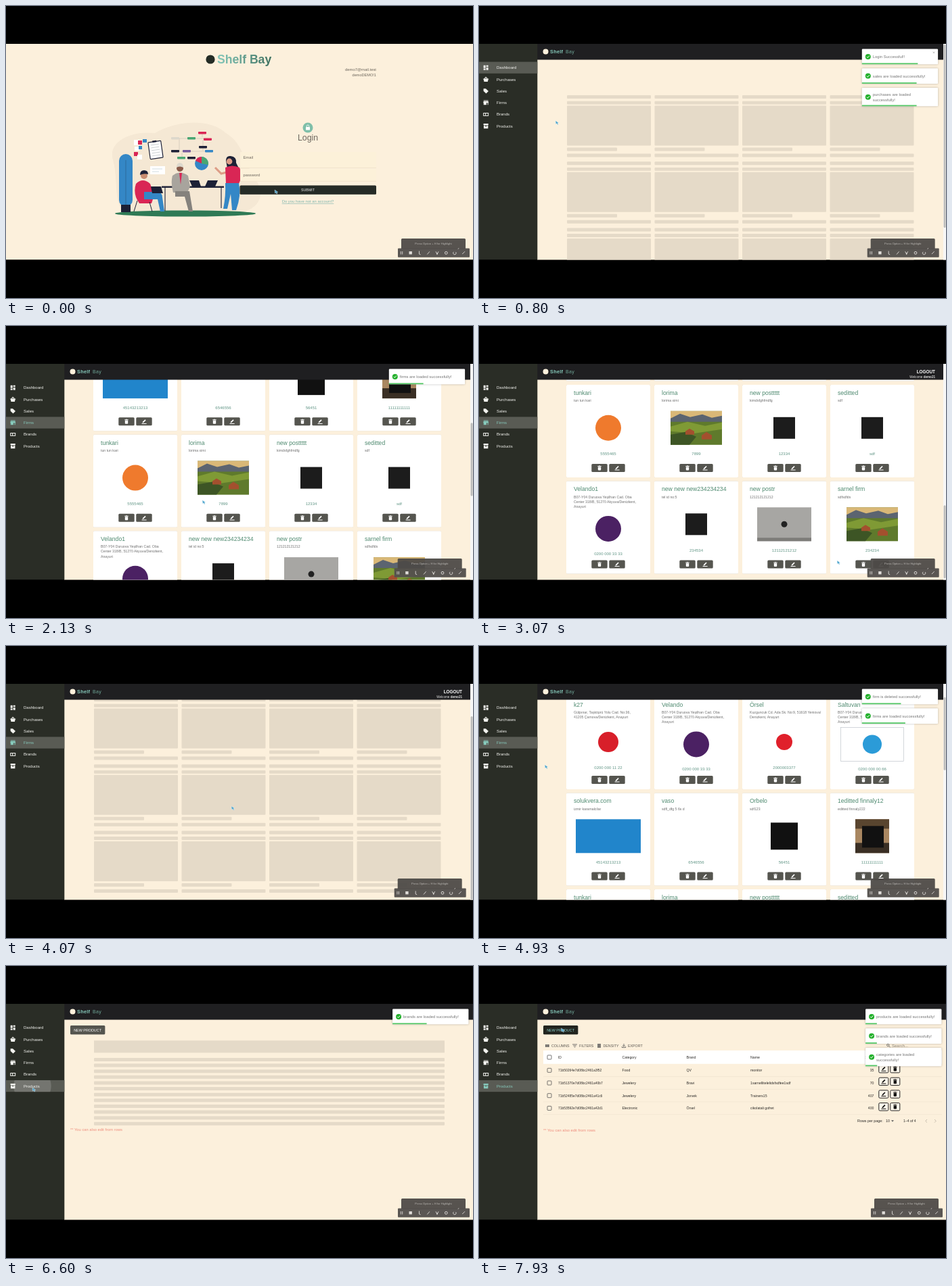
These frames come from a looping animation (690x432 px, 8000 ms). An HTML page:

```html
<!DOCTYPE html>
<html lang="en">
<head>
<meta charset="utf-8">
<title>Stock keeping demo</title>
<style>
  html, body { margin: 0; width: 100%; height: 100%; overflow: hidden; background: #000; }
  svg { display: block; width: 100%; height: 100%; font-family: "Liberation Sans", Arial, sans-serif; }
  .toast { filter: drop-shadow(0 .6px 1.6px #0004); }
  .card { filter: drop-shadow(0 .6px .7px #0003); }
</style>
</head>
<body>
<svg id="stage" viewBox="0 0 690 432"></svg>
<script>
const LOOP = 8000, VIEW = 318;
const CREAM = '#fcf0dc', GREEN = '#4f8a70', DARK = '#2a2d26', BTN = '#55554f', BONE = '#e5dac8', TEAL = '#86c9bb';
const RED = '#d92655', BLUE = '#3487c6', NAVY = '#1c2036';

// Markup helpers
const rect = (x, y, w, h, fill, r = 0, more = '') =>
  `<rect x="${x}" y="${y}" width="${w}" height="${h}" fill="${fill}" rx="${r}" ${more}/>`;
const circle = (x, y, r, fill, more = '') => `<circle cx="${x}" cy="${y}" r="${r}" fill="${fill}" ${more}/>`;
const oval = (x, y, rx, ry, fill) => `<ellipse cx="${x}" cy="${y}" rx="${rx}" ry="${ry}" fill="${fill}"/>`;
const path = (d, fill, more = '') => `<path d="${d}" fill="${fill}" ${more}/>`;
const line = (d, color, w = 1, more = '') => path(d, 'none', `stroke="${color}" stroke-width="${w}" ${more}`);
const text = (x, y, s, size, fill, more = '') => `<text x="${x}" y="${y}" font-size="${size}" fill="${fill}" ${more}>${s}</text>`;
const at = (x, y, body, more = '') => `<g transform="translate(${x} ${y})" ${more}>${body}</g>`;
const group = (id, body, more = '') => `<g id="${id}" ${more}>${body}</g>`;
const MID = 'text-anchor="middle"', END = 'text-anchor="end"', BOLD = 'font-weight="700"';
const repeat = (n, f) => Array.from({ length: n }, (_, i) => f(i)).join('');

const trash = c => path('M-2.2-1.6h4.4v4.2q0 .8-.8.8h-2.8q-.8 0-.8-.8zM-2.7-3h1.6l.4-.5h1.4l.4.5h1.6v.9h-5.4z', c);
const pen = c => path('M-2.4 1.9l.3-1.4 3.6-3.6 1.2 1.2-3.6 3.6zM-3.4 2.6h7v1h-7z', c);

// Login page
function illustration() {
  const tag = ([x, y, c]) => rect(x, y, 12, 3.4, c, .8);
  const tags = [[284, 186, RED], [244, 194, '#ddd8cc'], [268, 194, '#49a672'], [292, 195.5, RED], [285, 207, NAVY],
    [244, 213, NAVY], [261, 213, '#745a9c'], [294, 213, BLUE], [253, 223, '#49a672'], [268, 223, NAVY]];
  return path('M158 228C150 200 185 184 220 188C250 170 300 165 325 188C352 204 352 235 372 262C383 285 370 301 345 306H175C158 290 166 255 158 228Z', '#f5e8d4')
    + oval(265, 307, 104, 4.6, '#2f7a55')
    + rect(167, 219, 20, 78, BLUE, 10) + line('M177 228v66', '#2b6594', .8) + rect(170, 294, 14, 11, NAVY)
    + rect(189, 198, 8, 8, '#fff') + rect(195, 199, 6, 6, RED) + rect(202, 197, 6, 5, BLUE)
    + rect(190, 208, 7, 6, '#fff') + rect(196, 207, 5, 5, BLUE) + rect(189, 216, 6, 6, RED) + rect(194, 220, 7, 7, '#fff')
    + at(221, 213, rect(-9.5, -12.5, 19, 25, '#fff', 1, `stroke="${NAVY}" stroke-width="1.2"`) + rect(-3, -14, 6, 2.5, NAVY)
      + repeat(5, i => line(`M-6 ${-8 + i * 4}h12`, '#b9bfc2', .7)), '').replace('213)', '213) rotate(-8)')
    + rect(213, 237, 22, 12, '#fff') + line('M216 241h15M216 245h10', '#c6d3da', .8)
    + line('M290 189v5M250 196h48M256 196v19M291 198v16M250 215h48M260 217v7', '#b9b4a8', .5) + tags.map(tag).join('')
    + circle(289, 233, 10, BLUE) + path('M289 233V223A10 10 0 0 1 298.7 235Z', '#49a672') + path('M289 233V223A10 10 0 0 0 280 229Z', RED)
    // seated worker on the left
    + path('M192 263q10-10 21 0l6 17-4 12h-18q-10-14-5-29z', RED) + line('M194 288l-5 16M212 290l4 14', NAVY, 1)
    + path('M204 275h20q7 1 7 8l3 21h-6l-4-18h-20z', BLUE) + circle(204, 251, 5, '#c98d70') + path('M198 250q0-7 6-7t6 6q-6-2-12 1z', NAVY)
    // table with laptops
    + rect(230, 266.5, 92, 2.4, NAVY) + line('M235 268v35M318 268v31', NAVY, 1.1)
    + path('M214 267h15l3 10h-16zM271 258h14l3 9h-13zM298 258h15l-4 9h-15z', NAVY)
    // seated worker in the middle
    + path('M246 251q11-9 23 0l3 16-4 9h-21q-4-14-1-25z', '#a8a49d') + path('M250 274h21l5 30h-6l-6-22h-14z', '#85827d')
    + path('M256 247l2 17 2-17z', RED) + circle(257, 240, 5, '#8b5a48') + path('M252 239q0-7 5-7t5 7q-5-3-10 0z', '#ddd8cc')
    // standing presenter
    + path('M325 229q0-8 7-7 9 1 8 10l4 8h-17z', NAVY) + line('M326 246l-8 2-9-9', '#dd9c86', 3) + circle(330, 230, 4.4, '#dd9c86')
    + path('M324 239q10-5 21 0l4 12-5 12h-19z', RED) + path('M324 262h20q4 18-4 40h-6l-2-24-5 22h-6q4-20 3-38z', BLUE);
}

function login() {
  return rect(0, 56, 690, 319.5, CREAM)
    + `<linearGradient id="brand"><stop stop-color="${TEAL}"/><stop offset="1" stop-color="#3f7160"/></linearGradient>`
    + circle(302, 79, 6.6, '#242c25') + text(312, 85, 'Shelf Bay', 17.6, 'url(#brand)', BOLD)
    + text(547, 96, 'demo7@mail.test', 5.9, '#6b655c', END) + text(547, 104.3, 'demoDEMO!1', 5.6, '#6b655c', END)
    + illustration()
    + circle(446, 180, 7.5, '#7fbfa9') + rect(443, 179, 6, 4.6, '#fff', .7) + line('M444.3 179v-1.3a1.7 1.7 0 0 1 3.4 0v1.3', '#fff', .8)
    + text(446, 199, 'Login', 12.3, '#6d675e', MID)
    + rect(346, 216, 201, 23.5, '#fcf1d9', 1) + rect(346, 241, 201, 18.3, '#fcf1d9', 1)
    + line('M346 239.5h201M346 259.3h201', '#ece0c6', .7)
    + text(350.5, 226, 'Email', 5.8, '#6d675e') + text(350.5, 252, 'password', 5.8, '#6d675e')
    + rect(345.5, 265.5, 201.5, 13.2, '#252b26', 1.5, 'class="card"') + text(446, 274, 'SUBMIT', 5.3, '#eee', MID)
    + text(446, 291, 'Do you have not an account?', 5.9, '#7fb5ad', MID + ' text-decoration="underline"');
}

// Cards
const LINES = 'B07-Y04 Duruova Yeşilhan Cad. Oba|Center 318/B, 51270 Akyuva/Denizkent,|Anayurt';
const purple = ['circle', '#4b2163', 19], black = ['square', '#1c1c1c', 32], field = ['field'];
const TOP = [
  ['k27', 'Gülpınar, Taşköprü Yolu Cad. No:36,|41205 Çamova/Denizkent, Anayurt', '0200 000 11 22', ['circle', '#d81f2a', 15]],
  ['Velando', LINES, '0200 000 33 33', purple],
  ['Örsel', 'Kuzguncuk Cd. Ada Sk. No:9, 51618 Yeniova/|Denizkent, Anayurt', '2000003377', ['circle', '#e0202b', 12]],
  ['Saltuvan', LINES, '0200 000 00 66', ['framed', '#2b9bd8', 14]],
  ['solukvera.com', 'izmir karamalcilar', '45143213213', ['banner', '#2185cb']],
  ['vaso', 'sdfl_dfg 5 6s d', '6546556', ['none']],
  ['Orbelo', 'sdf123', '56451', ['square', '#111', 40]],
  ['1editted finnaly12', 'editted finnaly222', '11111111111', ['poster']]];
const BOTTOM = [
  ['tunkari', 'tun tun kari', '5555465', ['circle', '#ef7a2d', 19]],
  ['lorima', 'lorima ximi', '7899', field],
  ['new posttttt', 'kimdsfghfmdfg', '12334', black],
  ['seditted', 'sdf', 'sdf', black],
  ['Velando1', LINES, '0200 000 33 33', purple],
  ['new new new234234234', 'tel id no:5', '234534', black],
  ['new postr', '121212121212', '12112121212', ['laptop']],
  ['sarnel firm', 'sdfsdfds', '234234', field]];
const BRANDS = ['Vaso', 'Rilu', 'Bravi', 'Jorvek', 'Haldora', 'Örsel', 'Dolmy', 'QV',
  'Trainers', 'Orbelo', 'new brand', 'mestan', 'new new', 'brand12', 'sdf', 'test'];

function picture([kind, color, size]) {
  switch (kind) {
    case 'circle': return circle(0, 0, size, color);
    case 'square': return rect(-size / 2, -size / 2, size, size, color);
    case 'banner': return rect(-48, -25, 96, 50, color);
    case 'framed': return rect(-46.5, -25, 93, 50, '#fff', 0, 'stroke="#b5bcc4" stroke-width=".6"') + circle(0, 0, size, color);
    case 'poster': return rect(-25, -25, 50, 50, '#a98761') + rect(-25, -25, 50, 14, '#59452f') + rect(-25, 10, 50, 15, '#3a2f24') + rect(-15, -15, 32, 32, '#111');
    case 'laptop': return rect(-40, -25, 80, 50, '#a7a6a3') + rect(-40, 20, 80, 5, '#7d7c79') + circle(0, 0, 4.5, '#222');
    case 'field': return rect(-38, -25, 76, 50, '#5f7a2c') + rect(-38, -25, 76, 11, '#d9b877')
      + path('M-38-14l14-7 15 5 18-4 14 5 15-3v9h-76z', '#5b6470') + path('M-38-2l25-7 26 6 25-5v10l-40 6-36-3z', '#7f9a35')
      + path('M-38 10l22-4 16 7-10 12h-28z', '#3d5525') + path('M-16 5l6-4 7 4v5h-13zM8 11l7-5 8 5v6H8z', '#a3502e');
    default: return '';
  }
}

function card(i, title, desc = '', phone = '', image = ['none']) {
  const rows = desc.split('|'), n = rows.length;
  return at(129 + i % 4 * 130, 130 + Math.floor(i / 4) * 142.5,
    rect(0, 0, 124, 137, '#fff', 1.5, 'class="card"') + text(11, 14.8, title, 8.65, GREEN)
    + rows.map((s, k) => text(11, 25 + k * 7.1, s, 5.2, '#6f6f6f')).join('')
    + at(62, 60.5 + 3.3 * n, picture(image)) + text(62, 101.8 + 2.4 * n, phone, 6, '#5f9484', MID)
    + rect(37.3, 117, 23.4, 12, BTN, 1.5) + rect(63.3, 117, 23.4, 12, BTN, 1.5)
    + at(49, 123, trash('#fff')) + at(75, 123, pen('#fff')));
}

const heading = (title, button) => text(386, 104, title, 16.3, GREEN, MID + ' ' + BOLD)
  + rect(95, 108, 38.5, 13.5, BTN, 1.5, 'class="card"') + text(114.2, 116.8, button, 5.4, '#fff', MID);

const bones = () => repeat(12, i => {
  const bone = (y, w, h) => rect(0, y, w, h, BONE, 1);
  return at(130 + i % 4 * 129.5, 132 + Math.floor(i / 4) * 98.2,
    bone(0, 124, 5) + bone(8.7, 124, 4.8) + bone(15.6, 124, 59) + bone(77.6, 74, 5) + bone(86.6, 124, 5));
});

// Products page
const newProduct = group('newProduct', rect(95, 88, 51.3, 13.3, BTN, 1.5, 'class="card"') + text(120.6, 96.6, 'NEW PRODUCT', 5.4, '#fff', MID));
const hint = y => text(95, y, '** You can also edit from rows', 5.8, '#ee8c7c');

const productBones = () => rect(130, 110.3, 518, 18, BONE) + repeat(12, i => rect(130, 136 + i * 8.62, 518, 5, BONE, 1)) + hint(244);

function productTable() {
  const box = y => rect(101, y - 3, 6, 6, 'none', .8, 'stroke="#555" stroke-width=".8"');
  const cells = (y, ...c) => [117, 211.5, 306.5, 401].map((x, i) => text(x, y, c[i], i ? 5.2 : 4.95, '#2c2a28')).join('');
  const rows = [
    ['71b50264e7d08bc2461a3f52', 'Food', 'QV', 'monitor', 35],
    ['71b51370e7d08bc2461a40b7', 'Jewelery', 'Bravi', '1sarnellitelelidsfsdfee1sdf', 70],
    ['71b52485e7d08bc2461a41c6', 'Jewelery', 'Jorvek', 'Trainers15', 407],
    ['71b53592e7d08bc2461a42d1', 'Electronic', 'Örsel', 'cikolatali gofret', 400]];
  const tools = [[98, 'COLUMNS', 107], [138, 'FILTERS', 148], [175, 'DENSITY', 183.5], [211, 'EXPORT', 220]];
  const icons = ['M.8-2v4M2.8-2v4M4.8-2v4', 'M0-2h7M1.3 0h4.4M2.6 2h1.8', 'M0-2h5M0 0h5M0 2h5', 'M3-3v4M1.2-.6L3 1.2 4.8-.6M.3 1v1.6h5.4V1'];
  return tools.map(([x, s, tx], i) => at(x, 118, line(icons[i], '#555', [1.5, .8, 1.5, .8][i])) + text(tx, 120, s, 5.3, '#5b5751')).join('')
    + circle(604.3, 117, 1.7, 'none', 'stroke="#555" stroke-width=".8"') + line('M605.6 118.3l2 2', '#555', .9)
    + text(610, 119.8, 'Search...', 6, '#8d867b') + line('M601 122.5h83', '#bbb2a3', .5)
    + rect(95, 125, 589, 19.8, '#fff') + box(135) + cells(136.8, 'ID', 'Category', 'Brand', 'Name') + text(583.5, 136.8, 'Stock', 5.2, '#2c2a28', END)
    + rows.map((r, i) => {
      const y = 154.3 + i * 18.7;
      const button = (x, icon) => rect(x, y - 7.8, 14, 11.4, '#fdf6ea', 1.5, 'stroke="#222" stroke-width="1"') + at(x + 7, y - 2.2, icon('#111'));
      return box(y) + cells(y + 1.8, ...r) + text(583.5, y + 1.8, r[4], 5.2, '#2c2a28', END)
        + button(590.8, pen) + button(607.8, trash) + line(`M95 ${y + 9.3}h589`, '#e9decb', .5);
    }).join('')
    + text(559, 231.2, 'Rows per page:', 5.4, '#2c2a28') + text(601, 231.2, '10', 5.4, '#2c2a28')
    + path('M609 228.3h4l-2 2.2z', '#555') + text(627, 231.2, '1–4 of 4', 5.2, '#2c2a28')
    + line('M662 227l-2.3 2.3 2.3 2.3M673 227l2.3 2.3-2.3 2.3', '#b9b0a1', .8) + hint(245.4);
}

// Frame around the pages
const MENU = [
  ['Dashboard', 'M-3.5-3.5h3v4h-3zM.5-3.5h3v2.4h-3zM-3.5 1.4h3v2.2h-3zM.5-.2h3v3.8h-3z'],
  ['Purchases', 'M-4-1h1.6l1.7-2.7.9.5L-1.1-1h2.2L-.2-3.2l.9-.5L2.4-1H4v1h-.5l-.8 3.6h-5.4L-3.5 0H-4z'],
  ['Sales', 'M-3.6-3.6h3.4L3.8.3.3 3.8-3.6 0z'],
  ['Firms', 'M-3.4-3.4h6.8v1h-6.8zM-3.5-1.9h7l.5 2.2h-.6v3h-1v-3H.8v3h-4.2v-3H-4z'],
  ['Brands', 'M-4-2.4h8v4.8h-8zM-3-1.4v2.8h2v-2.8zM0-1.4v2.8h3v-2.8z'],
  ['Products', 'M-3.6-3.6h7.2v2h-7.2zM-3.2-1h6.4v4.6h-6.4zM-1.4-.2v.9h2.8v-.9z']];
const rowY = i => 91.2 + i * 17.27;

const sidebar = () => rect(0, 56, 86.3, 319.5, DARK) + rect(0, 0, 86.3, 17.2, '#595b54', 0, 'id="active"')
  + `<clipPath id="rowClip"><rect id="rowBox" width="86" height="17.2"/></clipPath>`
  + `<g clip-path="url(#rowClip)"><circle id="ripple" fill="#fff" opacity=".16"/></g>`
  + MENU.map(([s, d], i) => group('item' + i, at(10.2, rowY(i), path(d, 'inherit', 'fill-rule="evenodd"').replace('fill="inherit"', '')) + `<text x="26" y="${rowY(i) + 2.1}" font-size="6">${s}</text>`)).join('');

const header = () => rect(86, 56, 604, 23.5, '#1f1f21') + circle(98.5, 67.6, 4, CREAM)
  + text(105, 70.2, 'Shelf', 7.3, TEAL, BOLD + ' letter-spacing=".3"') + text(128, 70.2, 'Bay', 7, '#6fa697', 'letter-spacing=".4"')
  + group('user', text(674, 70.3, 'LOGOUT', 6.4, '#fff', END + ' ' + BOLD) + text(674, 76.7, 'Welcome <tspan font-weight="700">demo21</tspan>', 4.6, '#ddd', END));

const toolbar = () => rect(584, 344, 95, 16, '#4d4a47', 1.5, 'opacity=".94"') + rect(579, 358.5, 106, 13.3, '#54514e', 1, 'opacity=".96"')
  + text(631.5, 352.5, 'Press Option + H for Highlight', 4.1, '#bdbab6', MID)
  + line('M583.3 363v4.5M585.7 363v4.5M610.5 362.5v4.5l2 .8M622.3 367.5l3.6-4.2M635 363.2l2 4 2-4M637 365v3M661.5 363.8a2.2 2.2 0 1 0 3 .2M674.2 367l3.8-3.8M668 359.6l1-1.4', '#dedbd7', .9)
  + rect(595.5, 363, 4.4, 4.4, '#dedbd7') + circle(650.3, 365.3, 1.9, 'none', 'stroke="#dedbd7" stroke-width="1"');

// Messages: [lines, start, end, bar, entry]
const LOADED = ' are loaded successfully!';
const MESSAGES = [
  ['Login Successful!!', 430, 1830], ['sales' + LOADED, 450, 1700], ['purchases are loaded|successfully!', 450, 1700],
  ['firms' + LOADED, 1365, 2765], ['firm is deleted successfully!', 4250, 5650], ['firms' + LOADED, 4330, 5730],
  ['Please wait...', 5600, 5830, 'wait'], ['brands' + LOADED, 5830, 7230, 'swap'],
  ['products' + LOADED, 6740, 8140], ['brands' + LOADED, 6740, 8140], ['categories are loaded|successfully!', 6745, 8145]
].map(([s, start, end, mode], i) => ({ id: 'toast' + i, lines: s.split('|'), start, end, mode }));

const toast = m => {
  const h = m.h = m.lines.length > 1 ? 27.3 : 22.6, mid = h / 2;
  const icon = m.mode === 'wait' ? circle(9, mid, 3.3, 'none', 'stroke="#ddd" stroke-width=".9"') + line(`M9 ${mid - 3.3}a3.3 3.3 0 0 0-3.3 3.3`, '#777', .9)
    : circle(9, mid, 4, '#23b02c') + line(`M7 ${mid}l1.5 1.6 2.7-3.1`, '#fff', 1);
  return group(m.id, `<g class="toast">${rect(0, 0, 112.3, h, '#fff', 1.2)}</g>` + icon
    + m.lines.map((s, i) => text(16, mid + 2.1 + (i - (m.lines.length - 1) / 2) * 8.3, s, 5.85, '#757575')).join('')
    + (m === MESSAGES[0] ? line('M105 4l2.4 2.4M107.4 4L105 6.4', '#999', .6) : '')
    + (m.mode === 'wait' ? '' : rect(0, h - 1.8, 0, 1.8, '#55c766', 0, 'class="bar"')));
};

const PAGES = {
  dash: bones(),
  firmBones: heading('Firms', 'NEW FIRM') + bones(),
  firms: heading('Firms', 'NEW FIRM') + [...TOP, ...BOTTOM, ...BOTTOM].map((f, i) => card(i, ...f)).join(''),
  brandBones: heading('Brands', 'NEW BRAND') + bones(),
  brands: heading('Brands', 'NEW BRAND') + BRANDS.map((b, i) => card(i, b)).join(''),
  productBones: productBones(),
  products: productTable()
};

document.getElementById('stage').innerHTML = rect(0, 0, 690, 432, '#000')
  + '<clipPath id="screen"><rect y="56" width="690" height="319.5"/></clipPath><g clip-path="url(#screen)">'
  + group('login', login())
  + group('app', rect(86, 56, 604, 320, CREAM)
    + group('scroller', Object.entries(PAGES).map(([id, body]) => group(id, body)).join('')) + group('fixedButton', newProduct)
    + header() + sidebar() + group('scrollbar', rect(686, 56, 4, 320, '#f7f7f6') + rect(686.6, 0, 3, 0, '#bdbdbb', 1.5, 'id="thumb"')))
  + MESSAGES.map(toast).join('') + group('tools', toolbar())
  + group('cursor', path('M0 0l.5 5 1.3-1 1.2 2 1-.6-1-1.9 1.7-.3z', '#4aa3cc', 'stroke="#e8f5fa" stroke-width=".4"')) + '</g>';

// Steps: [time, page, menu row, page height]
const STEPS = [[0, 'login'], [420, 'dash', 0, 373], [1020, 'firmBones', 3, 373], [1360, 'firms', 3, 936], [3850, 'firmBones', 3, 373],
  [4300, 'firms', 3, 936], [5250, 'brandBones', 4, 373], [5660, 'brands', 4, 647], [6520, 'productBones', 5, 0], [6740, 'products', 5, 0]];
const SCROLL = [[0, 0], [1790, 0], [2560, 613], [3849, 613], [3850, 55], [6519, 55], [6520, 0]];
const POINTER = [[0, 397, 272], [450, 397, 272], [950, 36, 142], [1080, 36, 142], [1500, 154, 212], [1800, 154, 212], [2600, 520, 335],
  [3070, 529, 347], [3500, 567, 352], [3750, 567, 352], [4050, 333, 237], [4400, 333, 237], [5150, 36, 160], [5350, 36, 160],
  [5700, 38, 176], [6600, 39, 180], [7200, 39, 180], [7870, 121, 92], [8000, 122, 92]];
const CLICKS = [[1000, 36, 3], [5230, 36, 4], [6510, 39, 5]];

const el = Object.fromEntries([...document.querySelectorAll('[id]')].map(e => [e.id, e]));
const set = (e, o) => { for (const k in o) e.setAttribute(k, o[k]); };
const show = (e, on) => { e.style.display = on ? '' : 'none'; };
const move = (e, x, y) => e.setAttribute('transform', `translate(${x} ${y})`);
const bars = MESSAGES.map(m => el[m.id].querySelector('.bar'));

function track(keys, t) {
  const i = Math.max(1, keys.findIndex(k => k[0] > t));
  const a = keys[i - 1], b = t >= keys[keys.length - 1][0] ? keys[keys.length - 1] : keys[i];
  const u = Math.min(1, Math.max(0, (t - a[0]) / (b[0] - a[0] || 1))), e = u * u * (3 - 2 * u);
  return a.slice(1).map((v, k) => v + (b[k + 1] - v) * e);
}

function drawToasts(t, left) {
  let y = 63.6;
  MESSAGES.forEach((m, i) => {
    const swapped = m.mode === 'wait', leave = swapped ? 0 : 150;
    const on = t >= m.start && t < m.end + leave;
    show(el[m.id], on);
    if (!on) return;
    const u = m.mode === 'swap' ? 1 : Math.min(1, (t - m.start) / 200);
    const out = Math.max(0, (t - m.end) / leave || 0);
    const enter = u < .6 ? 125 * (1 - u / .6) ** 2 - 8 * u : (1 - u) * 10;
    move(el[m.id], left + enter + 190 * out * out * (out > 0) + 46 * out, y);
    if (bars[i]) set(bars[i], { width: 112.3 * Math.max(0, 1 - (t - m.start) / (m.end - m.start)) });
    y += m.h + 6.1;
  });
}

function draw(t) {
  const [since, page, row, height] = STEPS.filter(s => s[0] <= t).pop();
  const inApp = page !== 'login', shift = height ? 0 : 5.3;
  show(el.login, !inApp);
  show(el.app, inApp);
  for (const id in PAGES) show(el[id], id === page);
  show(el.fixedButton, page.startsWith('product'));

  const [scroll] = track(SCROLL, t);
  move(el.scroller, 0, -scroll);
  show(el.scrollbar, height);
  if (height) set(el.thumb, { y: 57 + scroll * VIEW / height, height: VIEW * VIEW / height });
  move(el.user, shift, 0);
  move(el.tools, shift - 5.3, 0);
  if (!height) move(el.tools, 0, 0);

  if (inApp) {
    const opened = STEPS.find(s => s[2] === row)[0];
    set(el.active, { y: rowY(row) - 8.6 });
    MENU.forEach((_, i) => set(el['item' + i], { fill: i === row && row && t - opened > 500 ? TEAL : '#f3f3ef' }));
  }
  const click = CLICKS.find(c => t >= c[0] && t < c[0] + 260);
  show(el.ripple, click);
  if (click) {
    const [start, x, i] = click, age = t - start;
    set(el.rowBox, { y: rowY(i) - 8.6 });
    set(el.ripple, { cx: x, cy: rowY(i), r: 5 + age * .25, opacity: .16 * Math.min(1, (260 - age) / 120) });
  }

  const hover = t > 7840, [face, label] = el.newProduct.children;
  set(face, { fill: hover ? '#22251f' : BTN });
  set(label, { fill: hover ? '#8fd6d0' : '#fff' });

  drawToasts(t, 565.8 + shift);
  move(el.cursor, ...track(POINTER, t));
}

const begin = performance.now();
(function tick() {
  draw((performance.now() - begin) % LOOP);
  requestAnimationFrame(tick);
})();
</script>
</body>
</html>
```
